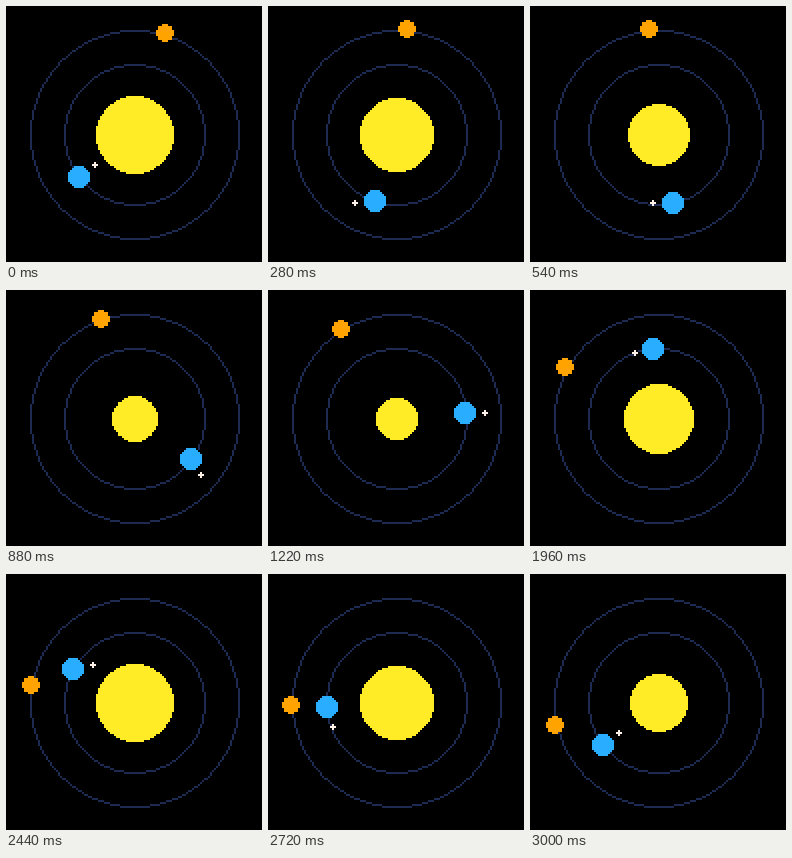
An HTML page with a canvas for the animation above (3.02 s loop, 256 by 256 pixels).

```html
<!DOCTYPE html>
<html>
<head>
<meta charset="utf-8">
<style>
  html, body { margin: 0; width: 100%; height: 100%; overflow: hidden; background: #000; }
  canvas { display: block; width: 256px; height: 256px; }
</style>
</head>
<body>
<canvas id="stage" width="256" height="256"></canvas>
<script>
const ctx = document.getElementById('stage').getContext('2d');
ctx.scale(2, 2); // 128 x 128 chunky pixels

const LOOP = 3020, STEP = 20, FIRST_TICK = 91, MID = 64;
const snap = v => Math.floor(v + 1e-6);
const cos = turn => Math.cos(turn * 2 * Math.PI);
const sin = turn => -Math.sin(turn * 2 * Math.PI); // y points down

// Pixel circle, mirrored over eight octants
function circle(x, y, r, color, filled) {
  x = snap(x); y = snap(y); r = snap(r);
  ctx.fillStyle = color;
  for (let b = 0; b <= r; b++) {
    const a = Math.round(Math.sqrt(r * r - b * b));
    if (a < b) break;
    for (const [dx, dy] of [[a, b], [b, a]]) {
      for (const row of [y - dy, y + dy]) {
        if (filled) {
          ctx.fillRect(x - dx, row, 2 * dx + 1, 1);
        } else {
          ctx.fillRect(x - dx, row, 1, 1);
          ctx.fillRect(x + dx, row, 1, 1);
        }
      }
    }
  }
}

const orbit = (turn, r, x = MID, y = MID) => [x + cos(turn) * r, y + sin(turn) * r];

function draw(ms) {
  const t = (FIRST_TICK + Math.floor((ms % LOOP) / STEP)) / 30;
  const [bx, by] = orbit(t / 5, 35);
  const [ox, oy] = orbit(t / 15, 52.5);
  const [mx, my] = orbit((bx + by) / 20, 10, bx, by); // moon angle follows the planet's place

  ctx.fillStyle = '#000';
  ctx.fillRect(0, 0, 128, 128);
  circle(MID, MID, 35, '#1d2b53', false);
  circle(MID, MID, 52.5, '#1d2b53', false);
  circle(MID, MID, 15 + 5 * sin(t / 4), '#ffec27', true);
  circle(bx, by, 5, '#29adff', true);
  circle(mx, my, 1, '#fff1e8', true);
  circle(ox, oy, 4, '#ffa300', true);
}

let start;
function frame(now) {
  start ??= now;
  draw(now - start);
  requestAnimationFrame(frame);
}
draw(0);
requestAnimationFrame(frame);
</script>
</body>
</html>
```
